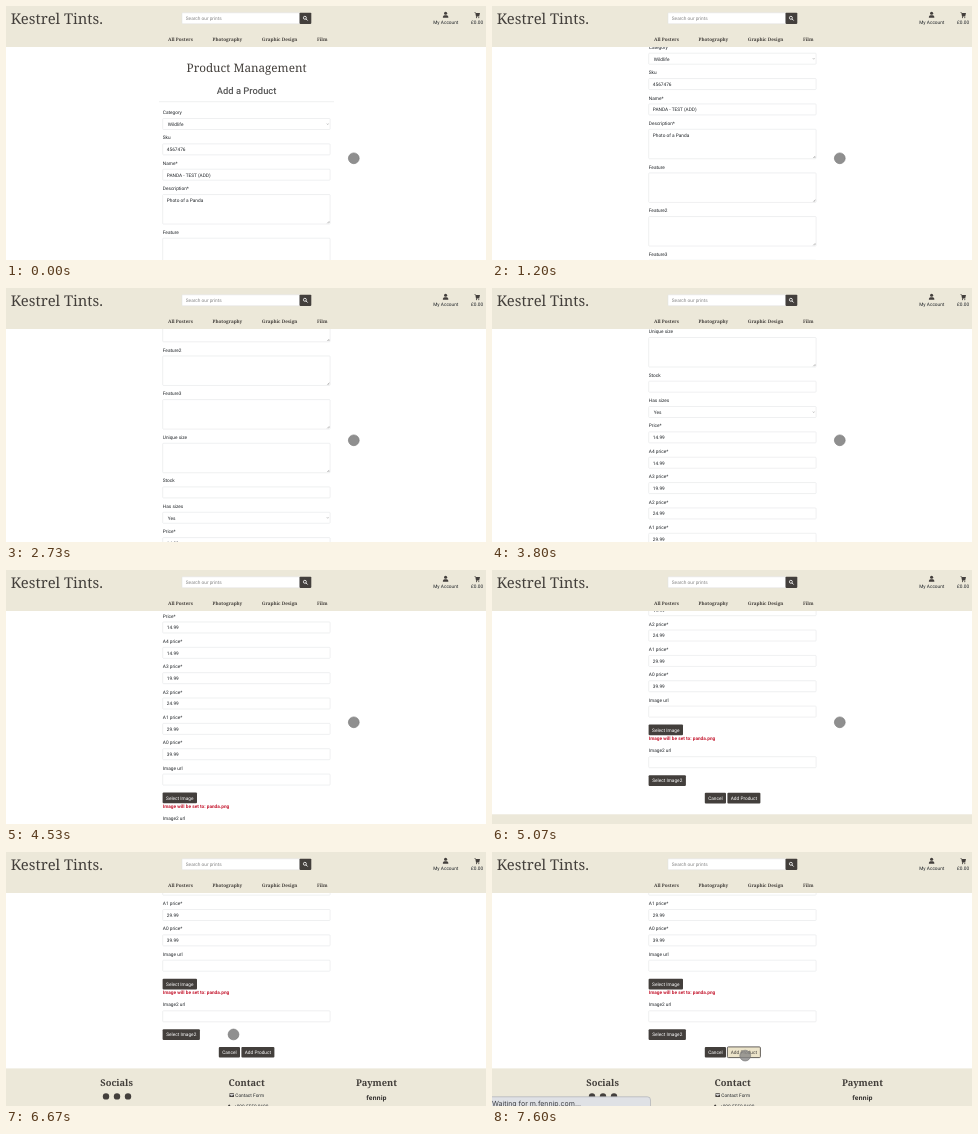
Write an HTML page that moves like this. It is 480 px wide and 254 px high and loops after 8000 ms.

```html
<!DOCTYPE html>
<html lang="en">
<head>
<meta charset="utf-8">
<title>Product Management</title>
<style>
  html, body { margin: 0; width: 100%; height: 100%; overflow: hidden; background: #fff; }
  svg { display: block; width: 100vw; height: 100vh; }
  text { font: 4.75px Roboto, sans-serif; fill: #212529; text-rendering: geometricPrecision; white-space: pre; }
  .serif { font-family: "Noto Serif", serif; fill: #433f3b; }
  .mid { text-anchor: middle; }
  .brand { font-size: 14.8px; }
  .nav { font-size: 4.6px; font-weight: 600; }
  .title { font-size: 11.7px; }
  .sub { font-size: 9.4px; font-weight: 500; fill: #555; }
  .foot { font-size: 9.3px; font-weight: 600; }
  .pay { font: 700 6.3px "Open Sans", sans-serif; fill: #33302e; }
  .hint { fill: #858585; }
  .alert { font-weight: 700; fill: #c51b32; }
  .light { fill: #fff; }
  .status { font: 7px Inter, sans-serif; fill: #3c3e42; }
  .box { fill: #fff; stroke: #dfe0e2; stroke-width: .5; }
  .line { fill: none; stroke: #777; stroke-width: .5; }
  .dark { fill: #433f3c; }
  .beige { fill: #ece8d9; }
</style>
</head>
<body>
<svg viewBox="0 0 480 254" preserveAspectRatio="none">
  <rect width="480" height="254" fill="#fff"/>
  <g id="page"></g>
  <g id="header"></g>
  <g id="status">
    <path d="M-2 244.8H155.5Q158.5 244.8 158.5 248V256H-2Z" fill="#dfe1e5" stroke="#aeb0b5" stroke-width=".7"/>
    <text class="status" x="0" y="254">Waiting for m.fennip.com...</text>
  </g>
  <circle id="cursor" r="5.4" fill="#858585" fill-opacity=".92" stroke="#747474" stroke-width=".6"/>
</svg>
<script>
const LOOP = 8000;
const NS = "http://www.w3.org/2000/svg";
const page = document.getElementById("page");
const header = document.getElementById("header");
const status = document.getElementById("status");
const cursor = document.getElementById("cursor");

function add(parent, tag, attrs, content) {
  const el = document.createElementNS(NS, tag);
  for (const key in attrs) el.setAttribute(key, attrs[key]);
  if (content) el.textContent = content;
  return parent.appendChild(el);
}
const text = (parent, x, y, content, cls = "") => add(parent, "text", { x, y, class: cls }, content);
const rect = (parent, x, y, width, height, cls, rx = 0) =>
  add(parent, "rect", { x, y, width, height, class: cls, rx });
const path = (parent, d, cls) => add(parent, "path", { d, class: cls });

function field(y, label, kind, value = "") {
  const tall = kind === "area";
  text(page, 156.8, y + 1.7, label);
  rect(page, 156.7, y + 6.1, 167.4, tall ? 29.5 : 11, "box", .8);
  text(page, kind === "select" ? 161.8 : 160.8, y + 13.4, value);
  if (kind === "select") path(page, `M320.9 ${y + 11.2}l.8 .9l.8 -.9`, "line");
  if (tall) path(page, `M321.3 ${y + 34.8}l2 -2M322.5 ${y + 34.8}l.9 -.9`, "line");
  return y + (tall ? 43.65 : 25.35);
}

function button(x, y, width, label) {
  return {
    face: rect(page, x, y, width, 10.7, "dark", 1),
    label: text(page, x + width / 2, y + 7.1, label, "mid light")
  };
}

// Scrolling form
text(page, 240.6, 66, "Product Management", "serif title mid");
text(page, 240.6, 88.4, "Add a Product", "sub mid");
path(page, "M153 95.7H328", "box");

let y = 106.4;
for (const [label, kind, value] of [
  ["Category", "select", "Wildlife"],
  ["Sku", "input", "4567476"],
  ["Name*", "input", "PANDA - TEST (ADD)"],
  ["Description*", "area", "Photo of a Panda"],
  ["Feature", "area"],
  ["Feature2", "area"],
  ["Feature3", "area"],
  ["Unique size", "area"],
  ["Stock", "input"],
  ["Has sizes", "select", "Yes"],
  ["Price*", "input", "14.99"],
  ["A4 price*", "input", "14.99"],
  ["A3 price*", "input", "19.99"],
  ["A2 price*", "input", "24.99"],
  ["A1 price*", "input", "29.99"],
  ["A0 price*", "input", "39.99"],
  ["Image url", "input"]
]) y = field(y, label, kind, value);

button(156.6, 628.1, 34.4, "Select Image");
text(page, 156.8, 643.9, "Image will be set to: panda.png", "alert");
field(654.1, "Image2 url", "input");
button(156.6, 678.7, 37.3, "Select Image2");
button(212.8, 696.3, 21.2, "Cancel");
const submit = button(235.4, 696.3, 33, "Add Product");

// Footer
rect(page, 0, 717.8, 480, 80, "beige");
text(page, 110.6, 735.9, "Socials", "serif foot mid");
text(page, 240.6, 735.9, "Contact", "serif foot mid");
text(page, 370.5, 735.9, "Payment", "serif foot mid");
for (const cx of [100, 111, 122]) add(page, "circle", { cx, cy: 745.8, r: 3.2, class: "dark" });
rect(page, 223.4, 742.6, 4.6, 3.7, "dark", .5);
path(page, "M223.5 743.6l2.2 1.5l2.2 -1.5", "box");
text(page, 229.3, 746.2, "Contact Form");
path(page, "M222.2 754.5l1.4 -.5l.8 1.4l-.7 .7l1.7 1.7l.8 -.6l1.3 .8l-.6 1.3q-4.8 .1 -4.7 -4.8", "dark");
text(page, 228, 757.6, "+000 5550 0100");
text(page, 370.4, 749.4, "fennip", "pay mid");

// Fixed header
rect(header, 0, 0, 480, 41, "beige");
text(header, 4.8, 18, "Kestrel Tints.", "serif brand");
rect(header, 176, 6.8, 118, 11, "box", .8);
text(header, 179.8, 14.2, "Search our prints", "hint");
rect(header, 293.5, 6.7, 11.8, 11.2, "dark", .8);
add(header, "circle", { cx: 298.9, cy: 11.8, r: 1.5, fill: "none", stroke: "#fff", "stroke-width": .8 });
add(header, "path", { d: "M300 12.9l1.6 1.6", stroke: "#fff", "stroke-width": .9 });
for (const [x, label] of [[174.5, "All Posters"], [221.4, "Photography"], [273.6, "Graphic Design"], [316.2, "Film"]])
  text(header, x, 35.2, label, "serif nav mid");
add(header, "circle", { cx: 439.6, cy: 7.2, r: 1.55, class: "dark" });
path(header, "M436.9 11.7V10.8Q437 9.2 438.5 9.2H440.7Q442.2 9.2 442.3 10.8V11.7Z", "dark");
text(header, 439.8, 17.7, "My Account", "mid");
path(header, "M468.3 6.2h1.3l.3 .8h4.1l-.7 2.9h-2.7l.1 .6h2.6v.6h-3.2l-.8 -4.3h-1z", "dark");
for (const cx of [470.5, 472.8]) add(header, "circle", { cx, cy: 11.6, r: .55, class: "dark" });
text(header, 471.1, 17.7, "£0.00", "mid");

// Motion: each key is [time, easing into it, ...values]
const clamp = v => Math.max(0, Math.min(1, v));
const linear = u => u;
const easeOut = u => 1 - (1 - u) ** 2;
const easeInOut = u => u * u * (3 - 2 * u);

const scrollKeys = [
  [350, linear, 0],
  [930, easeOut, 53.8],
  [1150, linear, 53.8],
  [1800, easeOut, 130],
  [2040, linear, 130],
  [2730, linear, 207.8],
  [3800, linear, 313.5],
  [5070, linear, 473.4],
  [5600, easeOut, 501.4]
];
const cursorKeys = [
  [5480, linear, 347.8, 152.3],
  [5800, easeInOut, 222, 124.3],
  [6330, easeInOut, 182, 145],
  [6380, linear, 182, 145],
  [6870, easeInOut, 253.2, 203.6]
];

function sample(keys, t) {
  const next = keys.findIndex(key => key[0] > t);
  if (next === 0) return keys[0].slice(2);
  if (next < 0) return keys[keys.length - 1].slice(2);
  const [t0, , ...from] = keys[next - 1];
  const [t1, ease, ...to] = keys[next];
  const u = ease((t - t0) / (t1 - t0));
  return from.map((v, i) => v + (to[i] - v) * u);
}

function mix(a, b, u) {
  return `rgb(${a.map((v, i) => Math.round(v + (b[i] - v) * u))})`;
}

function render(t) {
  const [scroll] = sample(scrollKeys, t);
  page.setAttribute("transform", `translate(0 ${-scroll})`);
  const [cx, cy] = sample(cursorKeys, t);
  cursor.setAttribute("cx", cx);
  cursor.setAttribute("cy", cy);

  const hover = clamp((t - 7040) / 200);
  submit.face.style.fill = mix([67, 63, 60], [236, 228, 202], hover);
  submit.face.style.stroke = hover ? "#55514c" : "none";
  submit.face.style.strokeWidth = .9 * hover;
  submit.label.style.fill = mix([255, 255, 255], [67, 63, 60], hover);
  cursor.setAttribute("fill-opacity", .92 - .14 * hover);
  status.setAttribute("opacity", clamp((t - 7380) / 200));
}

function tick(now) {
  render(now % LOOP);
  requestAnimationFrame(tick);
}
render(0);
requestAnimationFrame(tick);
</script>
</body>
</html>
```
